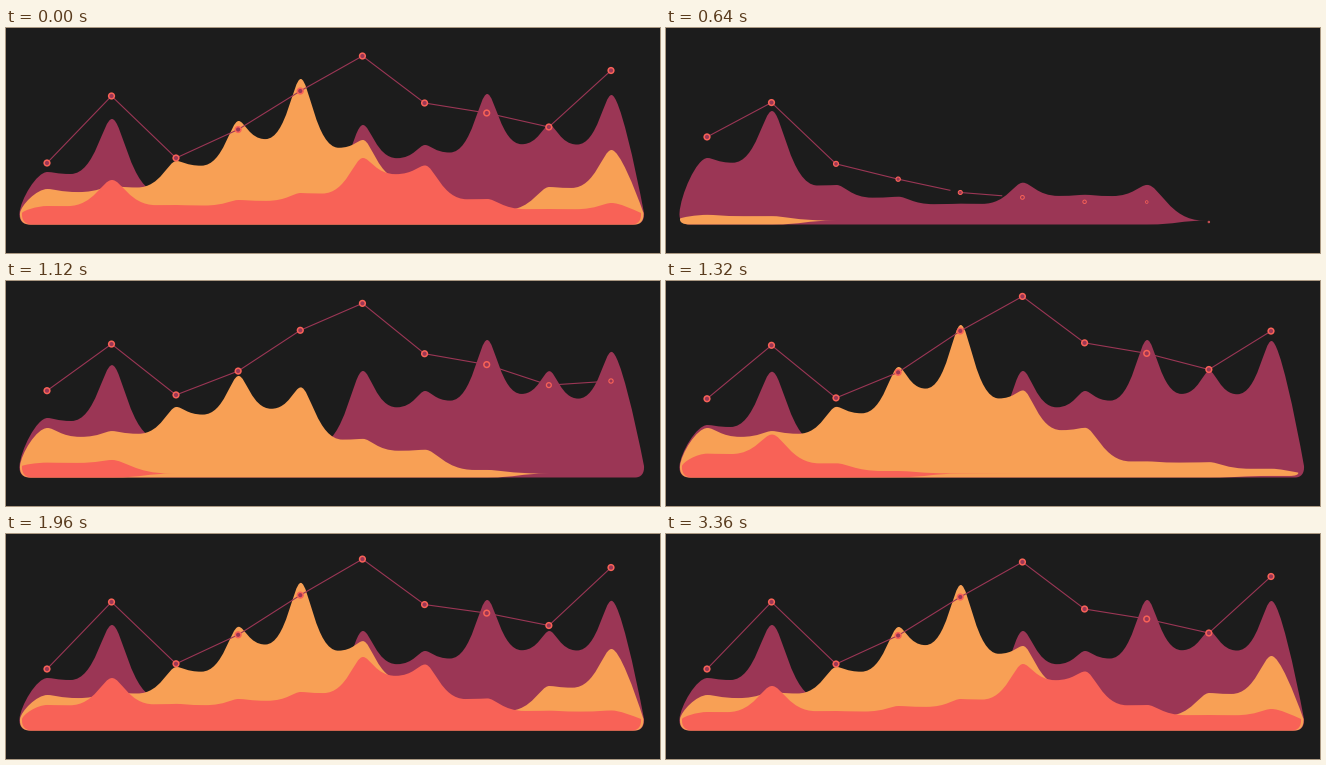
These frames come from a looping animation (654 by 225 pixels, 4360 ms). A matplotlib script:

```python
import numpy as np
import matplotlib.pyplot as plt
from matplotlib.animation import FuncAnimation
from matplotlib.patches import Circle, PathPatch
from matplotlib.path import Path

W, H, DPI = 654, 225, 100
STEP, FRAMES, LAST = 40, 109, 84
PT = 72 / DPI
BG, PLUM, ORANGE, CORAL = "#1c1c1c", "#9b3655", "#f8a055", "#f86257"
REST, DOT_REST = 192.5, 194

COL = np.arange(10)
X = np.interp(COL, [0, 2, 9], [41, 170, 605])
DELAY = 80 * COL
LINE_TOPS = np.array([135, 68, 130, 101.5, 63, 28, 75, 85, 99, 42.5])


def smooth(s):
    s = np.clip(s, 0, 1)
    return s * s * (3 - 2 * s)


def rise(t, length, lead, period):
    """Staggered growth from 0 to 1; columns near `lead` start faster."""
    power = 0.95 - 0.4 * np.cos(2 * np.pi * (COL - lead) / period)
    return smooth(np.clip((t - DELAY) / length, 0, 1) ** power)


def bend(x0, y0, x1, y1, near, far):
    """Level-ended curve from one point to the next."""
    w = x1 - x0
    return [(x0 + near * w, y0), (x1 - far * w, y1), (x1, y1)]


class Area:
    def __init__(self, color, start, left, right, lead, period, tops):
        self.start, self.left, self.right = start, left, right
        self.lead, self.period = lead, period
        self.full = REST - np.array(tops)
        self.over = np.minimum(7 * (1 + np.exp(-2 * COL)), 0.5 * self.full)
        self.x = X + 0.5
        self.patch = PathPatch(Path([(0, 0)]), fc=color, lw=0)

    def update(self, t):
        t = t - self.start
        grow = rise(t, 500, self.lead, self.period)
        settle = smooth((t - 970 - DELAY) / 300)
        height = grow * (self.full + self.over) - settle * self.over
        self.patch.set_path(self.outline(height, grow))

    def outline(self, height, grow):
        x, tops = self.x, REST - height
        floor = REST + 4 * np.minimum(1, 10 * grow)
        first, last = np.minimum(1, 2 * grow[[0, -1]])
        xl, xr = self.left, self.right - 6 * (1 - last)
        yl, yr = REST - 7.5 * first, REST - 7.5 * last

        # dips lie nearer the lower of two neighbours
        a, b = height[:-1], height[1:]
        low, high = np.minimum(a, b), np.maximum(a, b) + 0.01
        gap = np.diff(x)
        dip_x = (x[:-1] + x[1:]) / 2 + 0.4 * gap * (a - b) / (a + b + 0.01)
        dips = REST - low + 0.0037 * (low ** 2 / high) ** 2

        pts = [(xl, yl), (xl + 1, yl - 0.32 * (yl - tops[0])),
               (x[0] - 11, tops[0]), (x[0], tops[0])]
        for i in range(9):
            pts += bend(x[i], tops[i], dip_x[i], dips[i], 0.22, 0.6)
            pts += bend(dip_x[i], dips[i], x[i + 1], tops[i + 1], 0.6, 0.22)
        pts += [(x[-1] + 8, tops[-1]), (xr - 9, yr - 0.4 * (yr - tops[-1])),
                (xr, yr)]

        # rounded corner, floor from right to left, rounded corner
        px, py = xr - 9, floor[-1]
        pts += [(xr + 0.5, yr + 0.65 * (py - yr)), (xr - 3, py), (px, py)]
        for nx, ny in zip(x[::-1], floor[::-1]):
            pts += bend(px, py, nx, ny, 0.5, 0.5)
            px, py = nx, ny
        pts += bend(px, py, xl + 10, py, 0.5, 0.5)
        pts += [(xl + 3, py), (xl - 0.5, yl + 0.65 * (py - yl)), (xl, yl)]
        return Path(pts, [Path.MOVETO] + [Path.CURVE4] * (len(pts) - 1))


areas = [
    Area(PLUM, 0, 13.5, 638, 0.6, 6.9,
         [144, 91, 164, 172, 170, 97, 117, 66, 97, 67]),
    Area(ORANGE, 480, 14, 637.5, 2, 4.5,
         [161, 158, 133, 93, 51, 112, 149, 182, 159, 122]),
    Area(CORAL, 960, 16, 635, 0.6, 6.9,
         [178, 152, 177, 172, 165, 130, 137.5, 171, 181, 175]),
]

fig = plt.figure(figsize=(W / DPI, H / DPI), dpi=DPI, facecolor=BG)
ax = fig.add_axes([0, 0, 1, 1])
ax.set_xlim(0, W)
ax.set_ylim(H, 0)
ax.axis("off")

for area in areas:
    ax.add_patch(area.patch)
links = [ax.plot([], [], color=PLUM, lw=1.1 * PT, zorder=3)[0]
         for _ in range(9)]
dots = [ax.add_patch(Circle((x, DOT_REST), 0, fc=PLUM, ec=CORAL, zorder=4))
        for x in X]


def update(n):
    t = n * STEP if 0 < n < LAST else 10000
    for area in areas:
        area.update(t)

    over = 13 + 17 * (-0.45) ** COL
    grow = rise(t, 800, 0.6, 6.9)
    settle = smooth((t - 870 - DELAY) / 1000)
    y = DOT_REST - grow * (DOT_REST - LINE_TOPS + over) + settle * over

    age = t - DELAY
    size = np.interp(age, [-30, 0, 160, 440, 560], [0, 1.2, 2.2, 2.8, 3.6])
    for dot, x, cy, r in zip(dots, X, y, size):
        dot.center = x, cy
        dot.set_radius(0.79 * r)
        dot.set_linewidth(0.42 * r * PT)
        dot.set_visible(r > 0)

    drawn = np.clip(age / 480, 0, 1)
    for i, link in enumerate(links):
        k = drawn[i]
        link.set_data([X[i], X[i] + k * (X[i + 1] - X[i])],
                      [y[i], y[i] + k * (y[i + 1] - y[i])])
        link.set_visible(k > 0)
    return [a.patch for a in areas] + links + dots


anim = FuncAnimation(fig, update, frames=FRAMES, interval=STEP,
                     init_func=lambda: update(0), repeat=True, repeat_delay=0)
plt.show()
```
